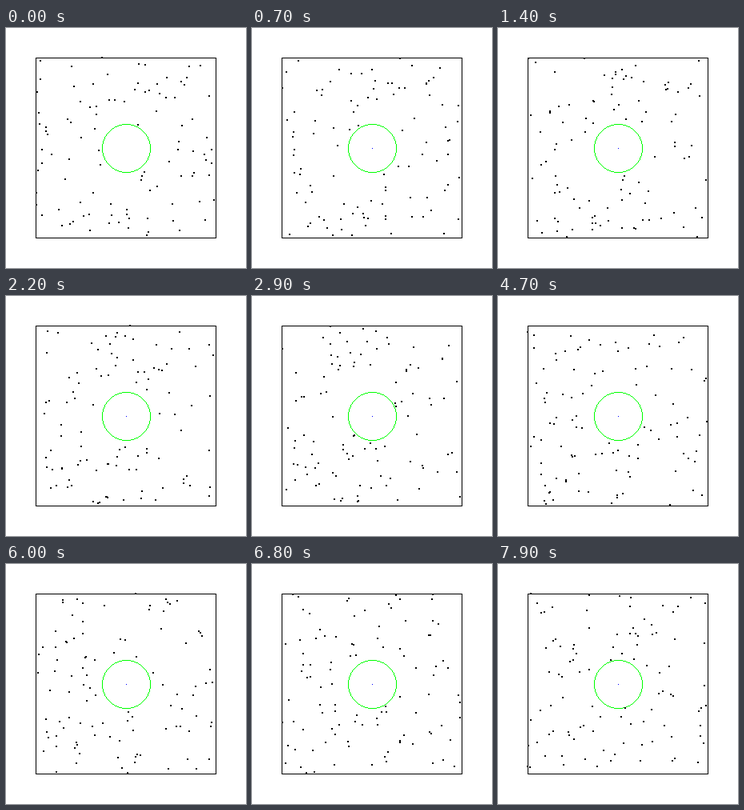
A matplotlib script that plays this animation: 300 by 300 pixels, repeating every 8000 ms.

```python
import numpy as np
import matplotlib.pyplot as plt
from matplotlib.animation import FuncAnimation
from matplotlib.collections import PolyCollection

SIZE, DPI = 300, 100
FRAMES, STEP_MS = 80, 100
COUNT, SPEED = 100, 2.6
LOW, HIGH = 37, 262
CENTER, RADIUS = np.array([150, 150]), 30
REACH = RADIUS + 1


def start_state(rng):
    """Scatter the gas evenly over the box, outside the disc."""
    pos = rng.uniform(LOW, HIGH, (4 * COUNT, 2))
    free = np.hypot(*(pos - CENTER).T) > REACH
    return pos[free][:COUNT], rng.normal(0, SPEED, (COUNT, 2))


def advance(pos, vel):
    """Move one step, bouncing off the walls and the disc."""
    pos, vel = pos + vel, vel.copy()

    under, over = pos < LOW, pos > HIGH
    pos = np.where(under, 2 * LOW - pos, pos)
    pos = np.where(over, 2 * HIGH - pos, pos)
    vel[under | over] *= -1

    offset = pos - CENTER
    dist = np.hypot(*offset.T)
    normal = offset / dist[:, None]
    inward = np.sum(vel * normal, axis=1)
    hit = (dist < REACH) & (inward < 0)
    vel[hit] -= 2 * inward[hit, None] * normal[hit]
    pos[hit] = CENTER + (2 * REACH - dist[hit, None]) * normal[hit]
    return pos, vel


def simulate():
    pos, vel = start_state(np.random.default_rng(7))
    track = [pos]
    for _ in range(FRAMES - 1):
        pos, vel = advance(pos, vel)
        track.append(pos)
    return track


def squares(corners, side=1):
    """Grid-aligned squares from their top-left pixels."""
    shape = np.array([[0, 0], [1, 0], [1, 1], [0, 1]]) * side
    return np.asarray(corners)[:, None, :] + shape


def gas_squares(pos):
    return squares(np.floor(pos) - 1, 2)


def box_pixels():
    return [p for k in range(LOW, HIGH + 1)
            for p in ((k, LOW), (k, HIGH), (LOW, k), (HIGH, k))]


def circle_pixels():
    """One-pixel ring, built from an eighth and mirrored."""
    points = set()
    for x in range(int(RADIUS / np.sqrt(2)) + 1):
        y = round(np.sqrt(RADIUS ** 2 - x ** 2))
        for a, b in ((x, y), (y, x)):
            points |= {(a, b), (-a, b), (a, -b), (-a, -b)}
    return CENTER + np.array(sorted(points))


fig = plt.figure(figsize=(SIZE / DPI, SIZE / DPI), dpi=DPI, facecolor="white")
ax = fig.add_axes([0, 0, 1, 1])
ax.set_xlim(0, SIZE)
ax.set_ylim(SIZE, 0)
ax.axis("off")


def add_pixels(verts, color):
    layer = PolyCollection(verts, facecolors=color, edgecolors="none",
                           linewidths=0, antialiaseds=False)
    return ax.add_collection(layer, autolim=False)


track = simulate()
add_pixels(squares(box_pixels()), "black")
add_pixels(squares(circle_pixels()), "#00ff00")
trail = add_pixels(squares([CENTER]), "blue")
gas = add_pixels(gas_squares(track[0]), "black")


def draw(i):
    gas.set_verts(gas_squares(track[i]))
    trail.set_visible(i > 0)
    return gas, trail


anim = FuncAnimation(fig, draw, frames=FRAMES, interval=STEP_MS,
                     repeat=True, repeat_delay=0, blit=False)
plt.show()
```
